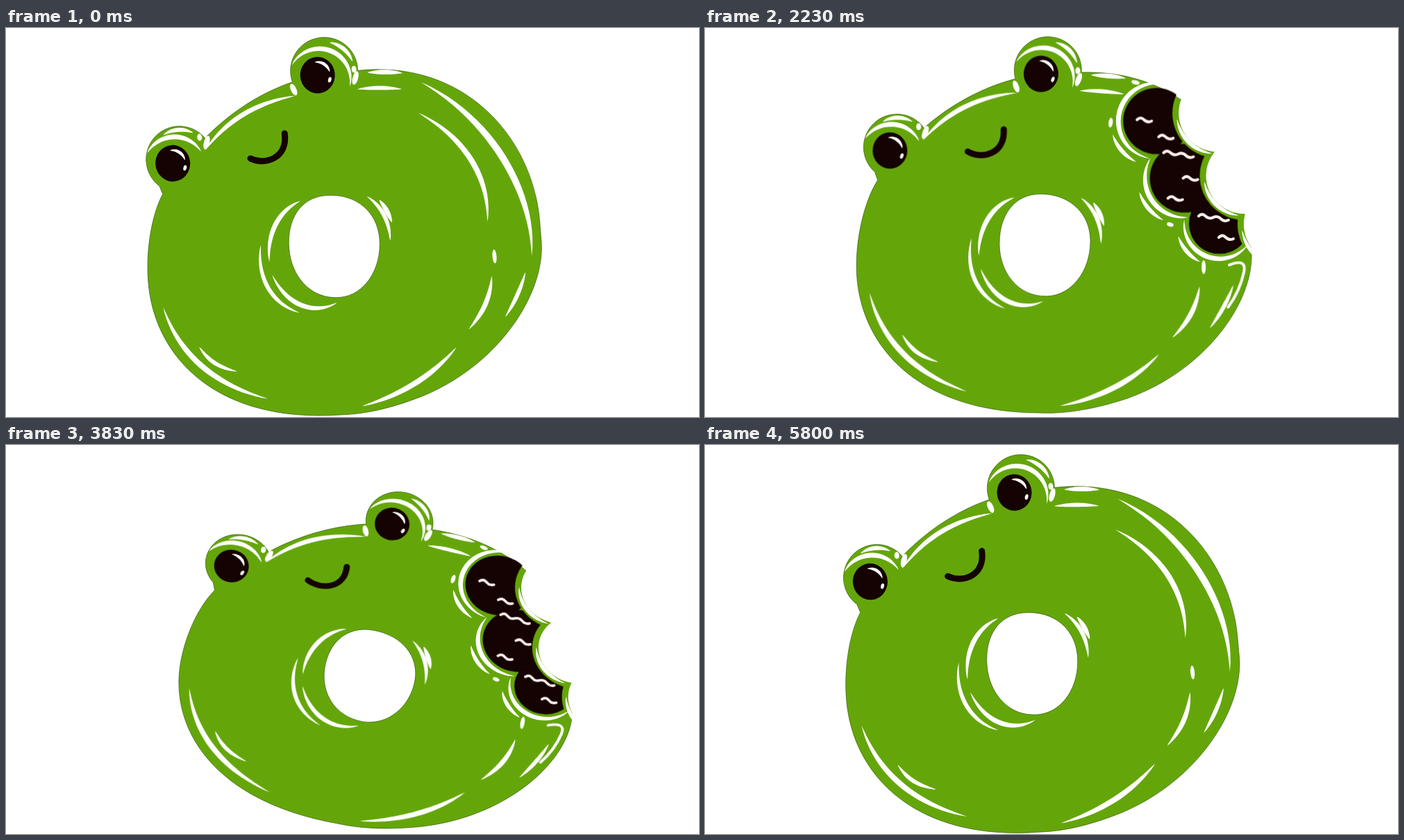
An HTML page for the animation above (6.03 s loop, 998 by 561 pixels).

```html
<!DOCTYPE html>
<html>
<head>
<meta charset="utf-8">
<style>
html, body { margin: 0; width: 100%; height: 100%; overflow: hidden; background: #fff; }
svg { display: block; width: 100vw; height: 100vh; }
</style>
</head>
<body>
<svg viewBox="0 0 998 561"><g id="donut"></g></svg>
<script>
const GREEN = '#64a60a', DARK = '#150202';
const donut = document.getElementById('donut');

const circle = (x, y) => ({ x, y, rx: 1, ry: 1 });
const polar = ({ x, y, rx, ry }, deg, r) => {
  const a = deg * Math.PI / 180;
  return [x + rx * r * Math.cos(a), y + ry * r * Math.sin(a)];
};
const line = (d, color, w) =>
  `<path d="${d}" fill="none" stroke="${color}" stroke-width="${w}" stroke-linecap="round"/>`;
const oval = (x, y, rx, ry, turn = 0, color = '#fff') =>
  `<ellipse rx="${rx}" ry="${ry}" fill="${color}" transform="translate(${x} ${y}) rotate(${turn})"/>`;
const disc = (x, y, r, color) => oval(x, y, r, r, 0, color);

// Tapered arc around a centre, its radius going from r0 to r1 with an optional bulge
function glint(centre, from, to, r0, r1, w, bulge = 0) {
  const outer = [], inner = [], n = 24;
  for (let i = 0; i <= n; i++) {
    const t = i / n, hump = Math.sin(Math.PI * t);
    const deg = from + (to - from) * t, a = deg * Math.PI / 180;
    const [x, y] = polar(centre, deg, r0 + (r1 - r0) * t + bulge * hump);
    const h = w / 2 * Math.max(0, hump) ** 0.75;
    const dx = h * Math.cos(a), dy = h * Math.sin(a);
    outer.push([x + dx, y + dy]);
    inner.unshift([x - dx, y - dy]);
  }
  return `<polygon fill="#fff" points="${[...outer, ...inner].join(' ')}"/>`;
}

// One frog eye; turn moves the gleams clockwise round the lid
function eye(x, y, turn) {
  const lid = circle(x, y), pupil = circle(x - 10, y + 5);
  return glint(circle(x - 8, y + 12), 213, 333 + turn, 45, 45, 7) +
    glint(lid, 241 + turn, 302 + turn, 42, 43, 6) +
    oval(...polar(lid, 317 + turn, 43), 3.5, 5) +
    oval(...polar(lid, 333 + turn, 46), 4, 10, 20) +
    oval(pupil.x, pupil.y, 25, 26.3, 0, DARK) +
    glint(pupil, 262, 350, 19, 18, 4.5) +
    oval(x + 7, y + 13, 2.3, 4, 20);
}

// Body outline: from the right, round the bottom and left, over both eyes, and the hole
const outline = 'M788,330C787,403 715,500 601,537C540,556 500,556 480,555C300,553 219,450 219,342' +
  'C219,295 232,245 250,217L246,205A48,48 0 1 1 320,146L320,139' +
  'C360,105 405,82 449,71A48.5,48.5 0 1 1 544.3,62C700,58 788,180 788,300Z' +
  'M425,310C425,268 447,238 484,238C528,238 556,268 556,306C556,350 528,386 492,386C450,386 425,350 425,310Z';
const body = `<path d="${outline}" fill="${GREEN}" fill-rule="evenodd" stroke="#2f4d08" stroke-width=".6"/>`;

const ring = { x: 504, y: 307, rx: 285, ry: 248 };
const hole = { x: 490, y: 312, rx: 66, ry: 74 };

// Teeth cut the body away; lobes are the dark filling left behind
const teeth = [[740, 122, 56], [778, 213, 55], [835, 283, 58]];
const lobes = [
  { x: 652, y: 133, r: 48, from: 292, to: 100 },
  { x: 692, y: 216, r: 50, from: 211, to: 85 },
  { x: 742, y: 282, r: 44, from: 187, to: 37 }
];
const cut = (id, grow) => `<mask id="${id}" maskUnits="userSpaceOnUse" x="0" y="0" width="998" height="600">
  <rect width="998" height="600" fill="#fff"/>${teeth.map(([x, y, r]) => disc(x, y, r + grow, '#000')).join('')}</mask>`;
const crumb = (x, y, waves) => line(`M${x},${y}q5,-5 10,0${'t11,2'.repeat(waves)}`, '#fff0ec', 4);

const whole = body +
  glint(ring, 297, 370, 1, 0.957, 10, -0.045) +
  glint(ring, 301, 356, 0.833, 0.735, 8, 0.01);

const bitten = cut('bite', 0) + cut('filling', 9) +
  `<g mask="url(#bite)">${body}` +
  lobes.map(({ x, y, r, from, to }) =>
    glint(circle(x, y), from, to, r + 7, r + 7, 7) +
    glint(circle(x, y), 163, 117, r + 18, r + 18, 6)).join('') +
  teeth.map(([x, y, r]) => glint(circle(x, y), 172, 98, r + 3, r + 3, 6)).join('') +
  `</g><g mask="url(#filling)">${lobes.map(({ x, y, r }) => disc(x, y, r, DARK)).join('')}</g>` +
  crumb(624, 131, 1) + crumb(655, 156, 1) + crumb(662, 179, 3) + crumb(690, 216, 1) +
  crumb(668, 245, 1) + crumb(712, 271, 3) + crumb(741, 302, 1) +
  oval(586, 135, 3, 7, 8) + oval(671, 283, 5, 3, 15) + oval(622, 77, 6, 3, 15) +
  line('M756,342Q781,332 777,352Q771,380 754,403', '#fff', 4);

const common =
  // lower left, bottom, lower right
  glint(ring, 162.5, 117, 0.98, 0.98, 8, 0.025) +
  glint(ring, 145, 130, 0.94, 0.915, 6, 0.02) +
  glint(ring, 88.5, 51.5, 0.96, 0.845, 8) +
  glint(ring, 20, 43.5, 0.78, 0.82, 7, 0.01) +
  glint(ring, 16, 33, 0.94, 0.935, 6) +
  oval(719, 345, 3, 10) +
  // between the eyes and upper right
  glint(ring, 222, 258, 0.89, 0.89, 7, 0.018) +
  glint(ring, 278.5, 292.5, 0.89, 0.93, 6) +
  glint(ring, 281, 291, 0.99, 1.02, 7) +
  // round the hole
  glint(hole, 235, 172, 1.14, 1.45, 7, 0.04) +
  glint(hole, 185, 125, 1.6, 1.51, 6, 0.11) +
  glint(hole, 162, 92, 1.47, 1.1, 7, 0.08) +
  glint(hole, 311, 359, 1.22, 1.23, 6, 0.03) +
  glint(hole, 322, 344, 1.35, 1.35, 7) +
  // face
  eye(278, 169, 0) + eye(496, 59, 44) + oval(450, 82, 4, 9, -20) +
  line('M380,176C400,188 434,180 432,144', DARK, 9);

donut.innerHTML = `<g>${whole}</g><g>${bitten}</g>${common}`;
const [wholeGroup, bittenGroup] = donut.children;

const LOOP = 6030, SECOND = 3067, STEP = 200 / 3;

function draw(now) {
  const t = now % LOOP;
  let u = t < 3000 ? t : t - SECOND;
  // The motion advances in even steps, shifted by half a step after the bite
  const shift = u < 633 ? 0 : STEP / 2;
  u = Math.floor((u - shift + 3) / STEP) * STEP + shift;

  const ease = (a, b) => (1 - Math.cos(Math.PI * Math.min(1, Math.max(0, (u - a) / (b - a))))) / 2;
  const angle = -5 + 15.9 * ease(-67, 600) - 10.9 * ease(633, 1233) - 5 * ease(2167, 2620);
  const squash = ease(300, 600) - ease(633, 1233) + ease(2200, 2470) - ease(2470, 2700);
  const isBitten = u > 590 && u < 2470;

  donut.setAttribute('transform',
    `translate(517 530) rotate(${angle}) scale(1 ${1 - 0.12 * squash}) translate(-517 -530)`);
  wholeGroup.style.display = isBitten ? 'none' : '';
  bittenGroup.style.display = isBitten ? '' : 'none';
}

const start = performance.now();
function tick() {
  draw(performance.now() - start);
  requestAnimationFrame(tick);
}
tick();
</script>
</body>
</html>
```
